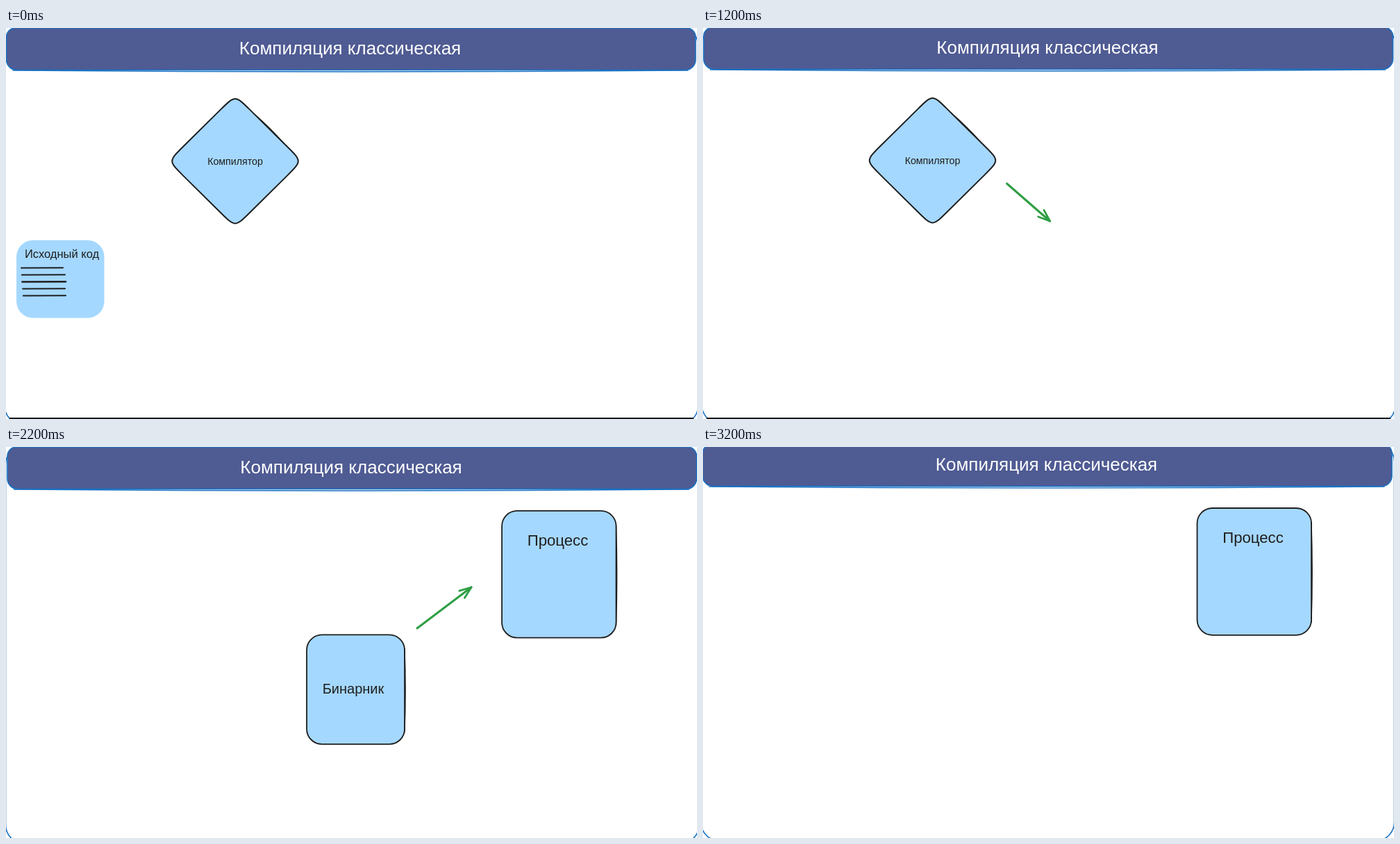
An HTML page with a canvas that plays this animation: 995 px wide and 563 px high, repeating every 3400 ms.

```html
<!DOCTYPE html>
<html lang="ru">
<head>
<meta charset="utf-8">
<style>
html, body { margin: 0; width: 100%; height: 100%; overflow: hidden; background: #fff; }
canvas { display: block; }
</style>
</head>
<body>
<canvas id="stage" width="995" height="563"></canvas>
<script>
const ctx = document.getElementById('stage').getContext('2d');
const STEP = 200, STEPS = 17;
const INK = '#1e1e1e', SKY = '#a5d8ff', BLUE = '#1971c2', GREEN = '#2f9e44';

// camera shake, one offset per step
const SHAKE = [[0, 0], [-.5, -1], [-1, -1.7], [0, -2.3], [1.5, -3], [.5, -1], [.5, -1], [1, -1.2],
  [1, -.7], [0, 0], [1, -.5], [1.5, 0], [.5, -.5], [0, -1], [-.5, -2], [-.7, -3], [-1, -3.9]];

function paint(fill, stroke, width = 1.8) {
  if (fill) { ctx.fillStyle = fill; ctx.fill(); }
  if (stroke) { ctx.strokeStyle = stroke; ctx.lineWidth = width; ctx.stroke(); }
}

function box(x, y, w, h, r, fill, stroke, width) {
  ctx.beginPath();
  ctx.roundRect(x, y, w, h, r);
  paint(fill, stroke, width);
}

function line(x1, y1, x2, y2, color, width, bowX = 0, bowY = 0) {
  ctx.beginPath();
  ctx.moveTo(x1, y1);
  ctx.quadraticCurveTo((x1 + x2) / 2 + bowX, (y1 + y2) / 2 + bowY, x2, y2);
  paint(null, color, width);
}

function label(text, x, y, size, color = INK) {
  ctx.font = size + 'px "Liberation Sans", Arial, sans-serif';
  ctx.textAlign = 'center';
  ctx.fillStyle = color;
  ctx.fillText(text, x, y);
}

function posed({ x, y, angle }, draw) {
  ctx.save();
  ctx.translate(x, y);
  ctx.rotate(angle * Math.PI / 180);
  draw();
  ctx.restore();
}

// wait two steps, tilt, then fly while turning
function flight(n, x, y, dx, dy) {
  const u = Math.max(0, n - 2);
  return { x: x + dx * u, y: y + dy * u, angle: n < 2 ? 0 : 12 + 22.3 * u };
}

function sourceCard() {
  box(-63, -56, 126.5, 112, 24, SKY);
  label('Исходный код', 2.5, -31, 16.5);
  for (let i = 0; i < 5; i++) {
    const y = -16 + i * 10;
    line(-56 + i * .7, y, [4, 7, 8, 7, 8][i], y - .3, INK, i === 2 ? 2.6 : 2);
  }
}

function roughBox(w, h) {
  box(-w / 2, -h / 2, w, h, 22, SKY, INK);
  line(w / 2, -h / 2 + 20, w / 2, h / 2 - 18, INK, 1.3, 2.4);
}

function binary(size) {
  roughBox(141, 157.5);
  label('Бинарник', -3.5, size * .3, size);
}

function process() {
  posed({ x: 794.8, y: 183.3, angle: 0 }, () => roughBox(164.5, 182.8));
  label('Процесс', 793, 142, 22.2);
}

function compiler() {
  const x = 330, y = 191.7, rx = 96, ry = 95, cut = .22;
  const tips = [[x, y - ry], [x + rx, y], [x, y + ry], [x - rx, y]];
  const toward = (a, b) => a.map((v, i) => v + (b[i] - v) * cut);
  ctx.beginPath();
  tips.forEach((p, i) => {
    const a = toward(p, tips[(i + 3) % 4]), b = toward(p, tips[(i + 1) % 4]);
    ctx.lineTo(...a);
    ctx.bezierCurveTo(...p, ...p, ...b);
  });
  ctx.closePath();
  paint(SKY, INK, 2);
  line(357, 123.5, 400, 166, INK, 1.3, 1.6, -1.6);
  label('Компилятор', 330, 196.5, 14.2);
}

function arrow(x1, y1, x2, y2) {
  const dir = Math.atan2(y2 - y1, x2 - x1);
  line(x1, y1, x2, y2, GREEN, 3);
  for (const spread of [-.36, .36])
    line(x2, y2, x2 - 18 * Math.cos(dir + spread), y2 - 18 * Math.sin(dir + spread), GREEN, 2.8);
}

function slide() {
  box(-2, -2, 998.5, 573, 27, '#fff', BLUE, 1.6);
  box(.5, 0, 992.5, 60.5, [13, 13, 15, 15], '#4f5b93', BLUE, 1.6);
  line(10, 61, 982, 61, BLUE, 1.3, 0, 4);
  label('Компиляция классическая', 495.5, 38, 26, '#fff');
}

function draw(k) {
  ctx.fillStyle = '#fff';
  ctx.fillRect(0, 0, 995, 563);
  ctx.save();
  ctx.translate(...SHAKE[k]);
  slide();

  if (k < 5) posed(flight(k, 78, 361.5, 79.5, -48.2), sourceCard);
  if (k > 6 && k < 10) {
    const left = 9 - k;
    posed({ x: 502 - 39.5 * left, y: 349.2 - 33.5 * left, angle: -10 * left }, () => binary(14.2));
  }
  if (k > 9 && k < 15) posed(flight(k - 10, 502, 349.2, 95.5, -71.2), () => binary(20));

  if (k < 10) compiler(); else process();

  if (k === 1) arrow(150, 290, 222, 240);
  if (k === 6) arrow(437, 225, 499, 279);
  if (k === 11) arrow(590.5, 261, 668.5, 202);
  ctx.restore();

  if (k < 10) {
    ctx.fillStyle = '#17171b';
    ctx.fillRect(5, 561, 985, 2);
  }
}

ctx.lineCap = ctx.lineJoin = 'round';
const start = performance.now();
function tick() {
  draw(Math.floor((performance.now() - start) / STEP) % STEPS);
  requestAnimationFrame(tick);
}
tick();
</script>
</body>
</html>
```
